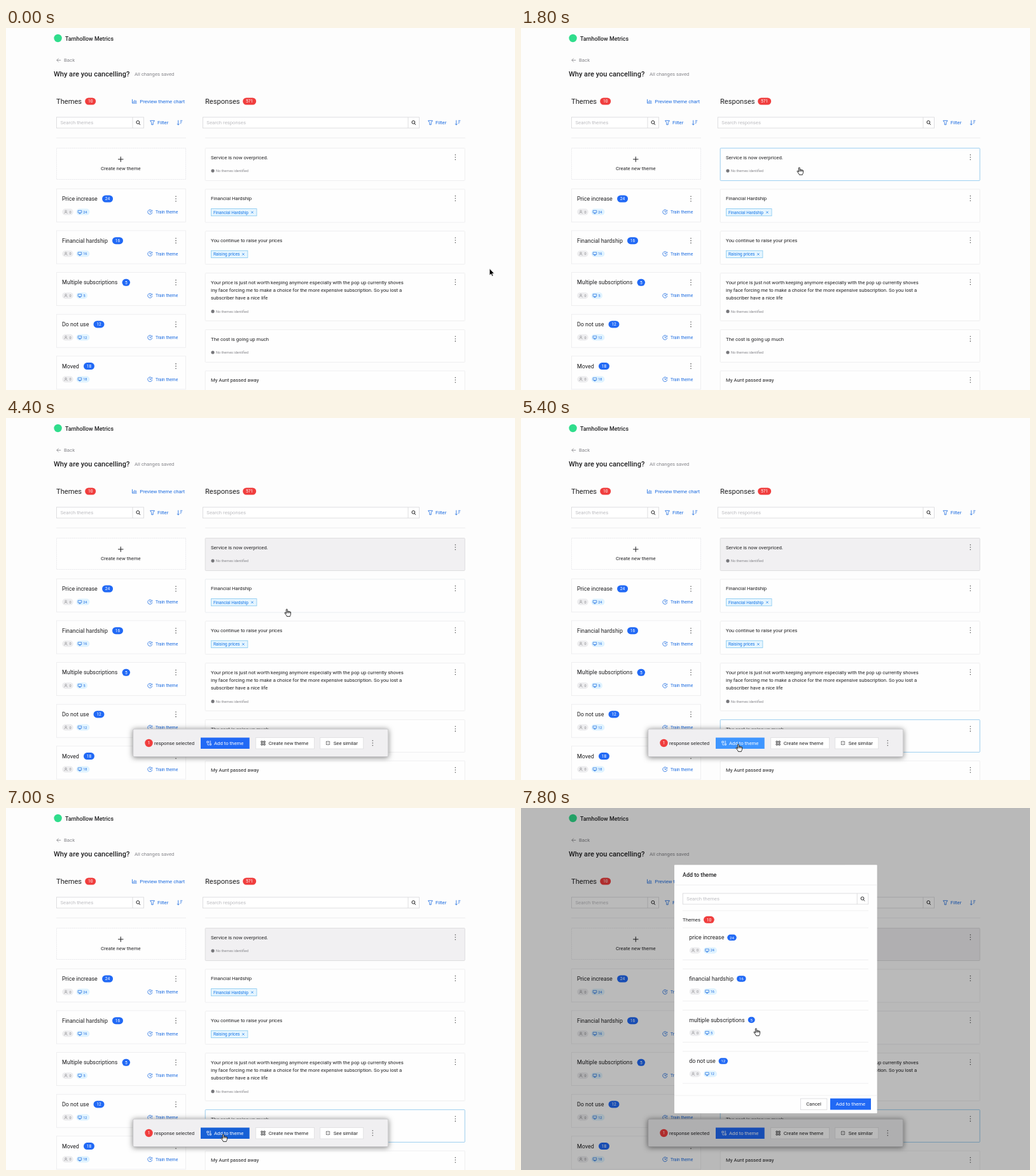
Write an HTML page that moves like this. It is 800 px wide and 568 px high and loops after 8000 ms.

```html
<!DOCTYPE html>
<html lang="en">
<head>
<meta charset="utf-8">
<title>Theme review</title>
<style>
  html, body { margin: 0; width: 100%; height: 100%; overflow: hidden; background: #fdfdfd; }
  svg { display: block; font-family: Roboto, sans-serif; }
</style>
</head>
<body>
<svg id="stage" width="800" height="568" viewBox="0 0 800 568"></svg>
<script>
const INK = '#202022', GREY = '#85858a', PALE = '#bdbdc1', LINK = '#1769e0', BLUE = '#2169f5', RED = '#f03e3e';
const EDGE = '#ebebed', GLOW = '#8ccaf2';
const L = 8.89, M = 7.78, S = 6.67, XS = 5.56, XL = 11.11; // type sizes

// Drawing helpers; text is centred vertically on y
const text = (x, y, str, size = M, fill = INK, more = '') =>
  `<text x="${x}" y="${y + size * 0.355}" font-size="${size}" fill="${fill}" ${more}>${str}</text>`;
const middle = 'text-anchor="middle"', medium = 'font-weight="500"';
const rect = (x, y, w, h, fill, stroke = 'none', more = '') =>
  `<rect x="${x}" y="${y}" width="${w}" height="${h}" fill="${fill}" stroke="${stroke}" stroke-width=".8" ${more}/>`;
const line = (x1, x2, y, color = EDGE) => `<path d="M${x1} ${y}H${x2}" stroke="${color}" stroke-width=".8"/>`;
const icon = (x, y, d, color = LINK, width = 0.8) =>
  `<path transform="translate(${x} ${y})" d="${d}" fill="none" stroke="${color}" stroke-width="${width}"/>`;
const pill = (x, y, w, h, fill, label = '', size = S, color = '#fff') =>
  rect(x - w / 2, y - h / 2, w, h, fill, 'none', `rx="${h / 2}"`) + text(x, y, label, size, color, middle);
const dots = (x, y) => [-3.7, 0, 3.7].map(d => `<circle cx="${x}" cy="${y + d}" r=".8" fill="#555"/>`).join('');

const ICONS = {
  search: 'M2 -.6A2.4 2.4 0 1 1 -2.8 -.6A2.4 2.4 0 1 1 2 -.6M1.2 1.3L3.4 3.4',
  filter: 'M-3.4 -3.2H3.4L1.2 .2V3.2H-1.2V.2Z',
  sort: 'M-2.3 -3.8V3.6M-4 1.8L-2.3 3.7L-.6 1.8M.8 -3.2H4.2M.8 -1H3.4M.8 1.2H2.4',
  chart: 'M-3.5 -3.2V3H3.6M-1.6 2V-.4M.4 2V-2M2.4 2V-1.2',
  back: 'M3.4 0H-3M0 -3L-3 0L0 3',
  plus: 'M-4.2 0H4.2M0 -4.2V4.2',
  person: 'M1.3 -1.2A1.3 1.3 0 1 1 -1.3 -1.2A1.3 1.3 0 1 1 1.3 -1.2M-2.4 2.6Q-2 .5 0 .5T2.4 2.6',
  screen: 'M-2.8 -2.3H2.8V1.3H-2.8ZM-1.4 2.6H1.4M0 1.3V2.6',
  train: 'M2.4 -2.5A3.5 3.5 0 1 0 3.5 .6M0 -2V.4H2M3.4 -3V-1.2H1.8',
  themes: 'M-3.2 -2.8H-.6V-.2H-3.2ZM1 -2.8H3.2M1 -.8H3.2M-2 1.2V3H0M1.2 1H3.4V3.2H1.2Z',
  grid: 'M-3 -3H-.7V-.7H-3ZM.9 -3H3.2V-.7H.9ZM-3 .9H-.7V3.2H-3ZM.9 .9H3.2V3.2H.9Z',
  shrink: 'M-3.4 -1.3H-1.3V-3.4M3.4 -1.3H1.3V-3.4M-3.4 1.3H-1.3V3.4M3.4 1.3H1.3V3.4',
};

const searchBox = (x, y, w, label) =>
  rect(x, y, w, 17, '#fff', '#d6d6d9') +
  `<path d="M${x + w - 17.5} ${y}v17" stroke="#d6d6d9" stroke-width=".8"/>` +
  text(x + 6, y + 8.5, label, M, PALE) + icon(x + w - 8.8, y + 8.5, ICONS.search, INK, 1);
const filterTools = x =>
  icon(x, 148.5, ICONS.filter) + text(x + 8, 148.5, 'Filter', M, LINK) + icon(x + 43, 148.5, ICONS.sort);
const stats = (x, y, n) => {
  const w = n > 9 ? 21 : 17.5;
  return pill(x + 9, y, 17.5, 10, '#ededef') + icon(x + 6, y, ICONS.person, '#8a8a8e', 0.6) +
    text(x + 13, y, '0', XS, GREY, middle) +
    pill(x + 22.5 + w / 2, y, w, 10, '#e0f3ff') + icon(x + 28, y, ICONS.screen, LINK, 0.7) +
    text(x + 36.3 - (n > 9 ? 0 : 1.2), y, n, XS, LINK, middle);
};
const tag = (y, label, w) =>
  rect(322.4, y - 5.6, w, 11.2, '#e5f5ff', '#84c8f0') + text(326, y, label, S, '#1677e8') +
  icon(322.4 + w - 7, y, 'M-1.7 -1.7L1.7 1.7M1.7 -1.7L-1.7 1.7', '#1677e8', 0.7);
const noThemes = y =>
  `<circle cx="325" cy="${y}" r="2.6" fill="#77777b"/>` + text(330, y, 'No themes identified', XS, GREY);

// name, count, badge centre on the page, badge centre in the dialog
const themes = [
  ['Price increase', 24, 159.6, 331.5],
  ['Financial hardship', 16, 175.5, 346.3],
  ['Multiple subscriptions', 5, 188.8, 362.2],
  ['Do not use', 12, 146, 317.8],
  ['Moved', 18, 130.5],
];
// top, height, lines, tag label, tag width
const responses = [
  [188.5, 51, ['Service is now overpriced.']],
  [253, 52, ['Financial Hardship'], 'Financial Hardship', 71.6],
  [318.7, 52, ['You continue to raise your prices'], 'Raising prices', 57.5],
  [384.5, 75, ['Your price is just not worth keeping anymore especially with the pop up currently shoves',
    'iny face forcing me to make a choice for the more expensive subscription. So you lost a',
    'subscriber have a nice life']],
  [473.4, 51, ['The cost is going up much']],
  [538, 52, ['My Aunt passed away']],
];

const themeCard = ([name, count, badgeX], i) => {
  const y = 268 + i * 65.65;
  return rect(79.5, y - 15.7, 203, 52, '#fefefe', EDGE) + text(88, y, name, L) +
    pill(badgeX, y, count > 9 ? 17 : 12.5, 11, BLUE, count) + dots(267, y) + stats(88, y + 20.6, count) +
    icon(226.3, y + 20.6, ICONS.train) + text(235, y + 20.6, 'Train theme', S, LINK);
};
const responseCard = ([top, height, lines, label, tagWidth], i) => {
  const y = top + 14.6, end = y + (lines.length - 1) * 12.3;
  return rect(313.2, top, 408, height, '#fefefe', EDGE, `rx="1" id="card${i}"`) +
    rect(313.2, top, 408, height, 'none', GLOW, `rx="1" opacity="0" id="glow${i}"`) +
    lines.map((s, k) => text(322, y + k * 12.3, s)).join('') + dots(706.3, y - 0.3) +
    (label ? tag(end + 21.6, label, tagWidth) : noThemes(end + 21));
};

const page =
  '<circle cx="81.6" cy="16" r="6.2" fill="#30dd8c"/>' +
  text(93, 16.8, 'Tarnhollow Metrics', L, INK, medium) +
  icon(82.8, 50.5, ICONS.back, GREY) + text(91, 50.5, 'Back', M, GREY) +
  text(75, 72.3, 'Why are you cancelling?', XL, INK, medium) + text(202, 72.3, 'All changes saved', M, GREY) +
  text(79, 115, 'Themes', XL) + pill(132.7, 115, 17, 11, RED, 10) +
  icon(202, 115, ICONS.chart) + text(210.3, 115, 'Preview theme chart', M, LINK) +
  text(313, 115, 'Responses', XL) + pill(382.7, 115, 21, 11, RED, 571) +
  searchBox(79.5, 140, 137, 'Search themes') + filterTools(230) +
  searchBox(309.3, 140, 340.2, 'Search responses') + filterTools(667) +
  line(79, 283, 172.5) + line(313, 722, 172.5) +
  rect(79.5, 188.5, 203, 49, '#fefefe', '#e4e4e7', 'stroke-dasharray="2 1"') +
  icon(180.3, 206, ICONS.plus, INK, 1) + text(180.3, 220, 'Create new theme', M, INK, middle) +
  themes.map(themeCard).join('') + responses.map(responseCard).join('');

const bar = '<g id="bar">' +
  rect(199.7, 488, 401, 43.5, '#f0eff1', '#b5b5b8', 'rx="1.5" filter="url(#shadow)"') +
  `<circle cx="224.5" cy="510" r="6.2" fill="${RED}"/>` + text(224.5, 510, 1, S, '#fff', middle) +
  text(233, 510, 'response selected') +
  rect(306, 501.5, 76.7, 17.5, BLUE, 'none', 'id="addButton"') +
  icon(319, 510, ICONS.themes, '#fff') + text(327, 510, 'Add to theme', M, '#fff') +
  rect(392.7, 501.5, 91.8, 17.5, '#fff', '#dedee0') + icon(404, 510, ICONS.grid, INK) + text(412.7, 510, 'Create new theme') +
  rect(493.7, 501.5, 68, 17.5, '#fff', '#dedee0') + icon(506, 510, ICONS.shrink, INK) + text(514.7, 510, 'See similar') +
  dots(576.3, 510) + '</g>';

const dialogRow = ([name, count, , badgeX], i) => {
  const y = 203.3 + i * 64.6;
  return line(254, 546, y - 15.3) + line(254, 546, y + 35) + text(264.2, y, name.toLowerCase(), L) +
    pill(badgeX, y, count > 9 ? 14.5 : 11, 9.5, BLUE, count, 6.2) + stats(264.5, y + 20.2, count);
};
const dialog = '<g id="dialog">' + rect(0, 0, 800, 568, '#000', 'none', 'opacity=".27"') +
  rect(241, 89.3, 318.7, 389.7, '#fefefe', 'none', 'rx="1"') +
  text(254, 104.7, 'Add to theme', L, INK, medium) + line(241, 559.7, 120.8) +
  searchBox(254.3, 134, 291.5, 'Search themes') + line(254, 546, 161) +
  text(254, 175.3, 'Themes') + pill(295.4, 175.3, 16.8, 11, RED, 10) +
  themes.slice(0, 4).map(dialogRow).join('') + line(241, 559.7, 451) +
  rect(439.4, 456, 41.5, 17.3, '#fff', '#d6d6d9') + text(460, 464.7, 'Cancel', M, INK, middle) +
  rect(486, 455.7, 64, 17.8, BLUE) + text(518, 464.7, 'Add to theme', M, '#fff', middle) + '</g>';

const cursors =
  '<path id="arrow" d="M-4 -6V4.6L-1.6 2.4L0 5.9L1.7 5.1L.2 1.8H3.4Z" fill="#000" stroke="#fff" stroke-width=".7"/>' +
  '<path id="hand" d="M-2.6 1.4V-4.7a.95 .95 0 0 1 1.9 0V-1.5a.9 .9 0 0 1 1.8 .1a.9 .9 0 0 1 1.8 .3a.85 .85 0 0 1 1.6 .5' +
  'V2.2C4.5 4 3.4 4.4 3.4 5.8H-1.6C-1.8 4.4 -3.4 3 -4.8 .8C-5.4 -.2 -4.2 -1 -3.4 .1ZM-.7 -1.5V.8M1.1 -1.4V.8M2.9 -1.1V.8" ' +
  'fill="#fff" stroke="#111" stroke-width=".9" stroke-linejoin="round"/>';

const $ = id => document.getElementById(id);
$('stage').innerHTML =
  '<defs><filter id="shadow" x="-10%" y="-60%" width="120%" height="220%">' +
  '<feDropShadow dx="0" dy="1" stdDeviation="4" flood-opacity=".5"/></filter></defs>' +
  page + bar + dialog + cursors;

const LOOP = 8000, STEP = 200;
// time, x, y of the pointer
const path = [
  [0, 764, 383.5], [600, 764, 383.5], [1000, 715, 361], [1200, 575, 292], [1400, 441, 225],
  [1600, 439, 224.5], [4200, 439, 224.5], [4400, 443, 305.5], [4800, 380, 450],
  [5200, 343, 517.5], [7200, 343, 517.5], [7600, 366, 375], [7800, 371, 351.5],
];
// response, time entered, time left
const hovers = [[2, 850, 1180], [1, 1060, 1360], [0, 1450, 3200], [1, 4380, 4420], [2, 4460, 4560], [3, 4580, 4780], [4, 4790, LOOP]];
const clamp = v => Math.max(0, Math.min(1, v));
const show = (id, on) => $(id).setAttribute('visibility', on ? 'visible' : 'hidden');

function pointerAt(t) {
  const next = path.findIndex(p => p[0] > t);
  if (next < 0) return path[path.length - 1].slice(1);
  const [t0, x0, y0] = path[next - 1], [t1, x1, y1] = path[next];
  const k = (t - t0) / (t1 - t0);
  return [x0 + (x1 - x0) * k, y0 + (y1 - y0) * k];
}

function draw(now) {
  const t = Math.floor(now % LOOP / STEP) * STEP;
  const glow = responses.map(() => 0);
  for (const [i, enter, leave] of hovers) {
    const fade = clamp((Math.min(t, leave) - enter) / 300) * clamp(1 - (t - leave) / 300);
    glow[i] = Math.max(glow[i], fade);
  }
  const selected = t >= 3200;
  if (selected) glow[0] = 0;
  glow.forEach((v, i) => $('glow' + i).setAttribute('opacity', v));
  $('card0').setAttribute('fill', selected ? '#f1f0f2' : '#fefefe');
  $('card0').setAttribute('stroke', selected ? '#d8d8da' : EDGE);

  show('bar', t >= 3400);
  show('dialog', t >= 7200);
  const pressed = t >= 6800 && t < 7200, hovered = t >= 5200 && t < 6800;
  $('addButton').setAttribute('fill', pressed ? '#1760d6' : hovered ? '#3f96ff' : BLUE);

  const [x, y] = pointerAt(t);
  for (const id of ['arrow', 'hand']) $(id).setAttribute('transform', `translate(${x} ${y})`);
  show('arrow', t < 1000);
  show('hand', t >= 1000);
}

const start = performance.now();
function tick() {
  draw(performance.now() - start);
  requestAnimationFrame(tick);
}
tick();
</script>
</body>
</html>
```
